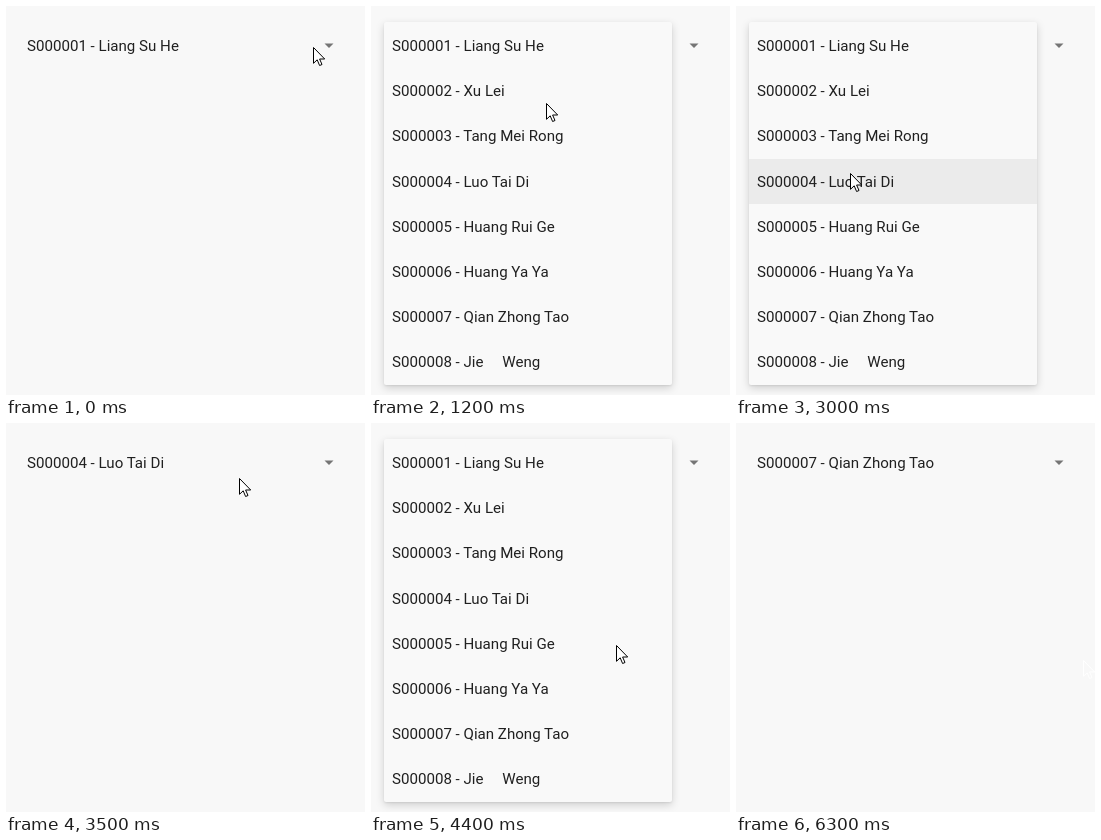
An HTML page that plays this animation: 359x389 px, repeating every 7300 ms.

```html
<!DOCTYPE html>
<html lang="en">
<head>
<meta charset="utf-8">
<title>Dropdown list</title>
<style>
  html, body { margin: 0; width: 100%; height: 100%; overflow: hidden; background: #f8f8f8; }
  #stage {
    position: relative; width: 359px; height: 389px; overflow: hidden;
    font: 15.1px/45.2px Roboto, sans-serif; color: #202020; white-space: pre;
  }
  #stage > * { position: absolute; }
  #title { left: 21px; top: 18px; }
  #popup {
    left: 13px; top: 16px; width: 288px; height: 362.5px;
    background: #f9f9f9; border-radius: 2px;
    box-shadow: 0 3px 9px rgba(0, 0, 0, .17), 0 1px 2px rgba(0, 0, 0, .07);
  }
  .row { position: absolute; left: 0; width: 100%; height: 45.2px; overflow: hidden; }
  .row span { position: absolute; left: 8px; top: .6px; }
  .row i {
    position: absolute; left: 50%; top: 50%; border-radius: 50%;
    transform: translate(-50%, -50%); background: #ebebeb;
  }
  #halo {
    left: 304px; top: 21px; width: 38px; height: 38px;
    border-radius: 50%; background: #000;
  }
  svg { left: 0; top: 0; overflow: visible; }
</style>
</head>
<body>
<div id="stage">
  <div id="title"></div>
  <div id="halo"></div>
  <svg width="359" height="389"><path d="M318.5 37.5h9l-4.5 4.6z" fill="#757575"/></svg>
  <div id="popup"></div>
  <svg id="cursor" width="13" height="20">
    <path d="M.5 .5V16.3L4.2 12.8 6.6 18.5 9 17.5 6.6 12H11.7Z"/>
  </svg>
</div>
<script>
const LOOP = 7300, STEP = 100, ROW = 45.2, FADE = 300, EXIT = 6300;
const names = [
  'Liang Su He', 'Xu Lei', 'Tang Mei Rong', 'Luo Tai Di',
  'Huang Rui Ge', 'Huang Ya Ya', 'Qian Zhong Tao', 'Jie     Weng'
];
const labels = names.map((name, i) => `S00000${i + 1} - ${name}`);

// The list opens, then a row is pressed; the list closes shortly after.
const visits = [
  { open: 800, press: 2900, row: 3 },
  { open: 4000, press: 5800, row: 6 }
];

const home = { x: 307, y: 41 };
const moves = [
  { from: 0, to: 200, x: 230, y: 36 },
  { from: 900, to: 1200, x: 175, y: 97 },
  { from: 1200, to: 1500, x: 163, y: 121 },
  { from: 1500, to: 2100, x: 95, y: 358 },
  { from: 2100, to: 2400, x: 114, y: 167 },
  { from: 3000, to: 3500, x: 233, y: 55 },
  { from: 3500, to: 3800, x: 236, y: 42 },
  { from: 4000, to: 4400, x: 245, y: 222 },
  { from: 4400, to: 5200, x: 222, y: 303 },
  { from: 5300, to: 5500, x: 216, y: 309 },
  { from: 5900, to: EXIT, x: 347, y: 237 }
];

const $ = id => document.getElementById(id);
const title = $('title'), popup = $('popup'), halo = $('halo'), cursor = $('cursor');

const ripples = labels.map((label, i) => {
  const row = document.createElement('div');
  const ripple = document.createElement('i');
  const text = document.createElement('span');
  row.className = 'row';
  row.style.top = 1.4 + ROW * i + 'px';
  text.textContent = label;
  row.append(ripple, text);
  popup.append(row);
  return ripple;
});

const progress = (t, from, to) => Math.min(1, Math.max(0, (t - from) / (to - from)));
const easeOut = k => 1 - (1 - k) ** 1.3;

function pointer(t) {
  let { x, y } = home;
  for (const move of moves) {
    const k = easeOut(progress(t, move.from, move.to));
    x += (move.x - x) * k;
    y += (move.y - y) * k;
  }
  return { x: Math.round(x), y: Math.round(y) };
}

function draw(t) {
  const { x, y } = pointer(t);
  const gone = t >= EXIT;
  cursor.style.transform = `translate(${x}px, ${y}px)`;
  cursor.style.stroke = gone ? '#fff' : '#000';
  cursor.style.fill = gone ? '#f8f8f8' : '#fff';

  let selected = 0, shown = 0, glow = 0;
  for (const { open, press, row } of visits) {
    const close = press + 100;
    shown += progress(t, open, open + FADE) - progress(t, close, close + FADE);
    if (t >= open) glow = .08 * (1 - progress(t, open, open + FADE));
    if (t >= close + 200) selected = row;

    const spread = progress(t, press, press + 100);
    const visible = t >= press && t < close + FADE;
    ripples[row].style.width = ripples[row].style.height = visible ? 180 + 140 * spread + 'px' : 0;
  }
  popup.style.opacity = shown;
  halo.style.opacity = glow;
  title.textContent = labels[selected];
}

const start = performance.now();
function tick() {
  const t = (performance.now() - start) % LOOP;
  draw(Math.floor(t / STEP) * STEP);
  requestAnimationFrame(tick);
}
tick();
</script>
</body>
</html>
```
